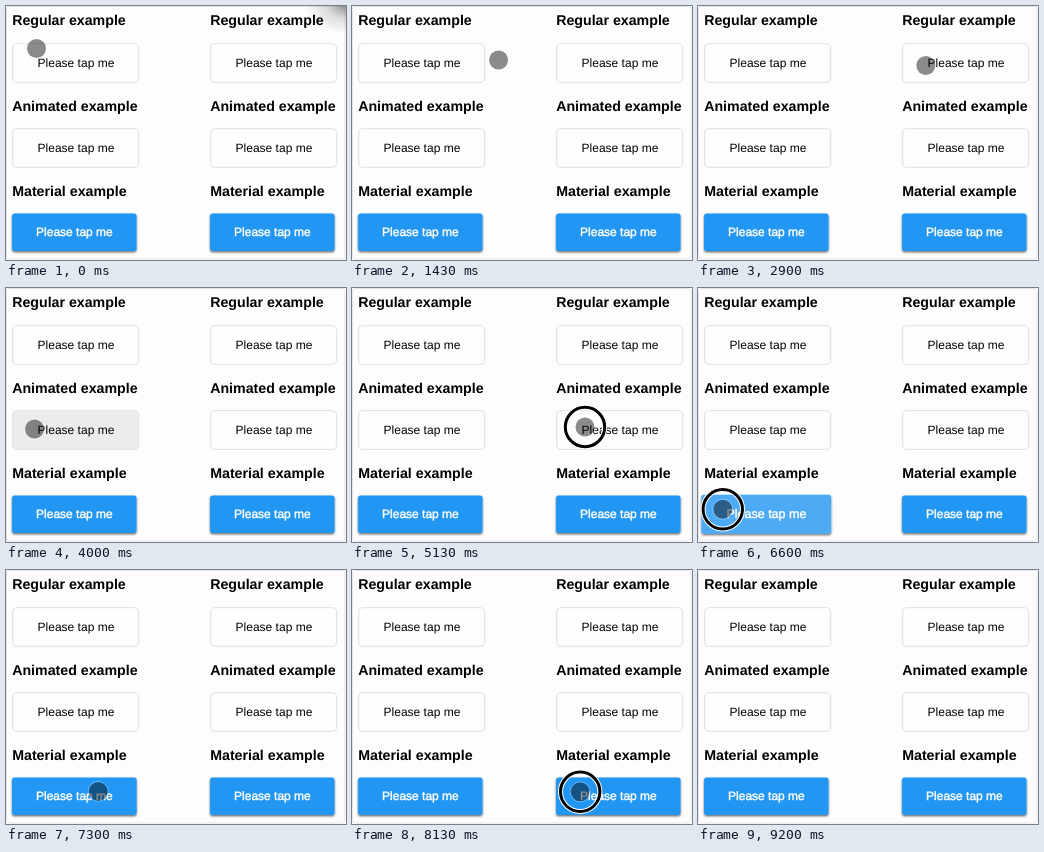
An HTML page that plays this animation: 340 by 254 pixels, repeating every 9.71 s.

```html
<!DOCTYPE html>
<html lang="en">
<head>
<meta charset="utf-8">
<title>Tap examples</title>
<style>
html, body { margin: 0; width: 100%; height: 100%; overflow: hidden; background: #fff; }
svg { display: block; width: 340px; height: 254px; }
text { font-family: "Liberation Sans", Arial, sans-serif; font-size: 12px; text-rendering: geometricPrecision; }
.title { font-size: 14.2px; font-weight: bold; }
.card { stroke: #e5e5e5; stroke-width: 1.4; }
.label { fill: #fff; stroke: #fff; stroke-width: .5; stroke-opacity: .8; text-anchor: middle; }
</style>
</head>
<body>
<svg viewBox="0 0 340 254">
  <defs>
    <filter id="shadow" x="-10%" y="-20%" width="120%" height="150%">
      <feDropShadow dx="0" dy="1.2" stdDeviation="1.2" flood-color="#000" flood-opacity=".62"/>
    </filter>
    <radialGradient id="shade">
      <stop offset="0" stop-opacity=".42"/>
      <stop offset=".45" stop-opacity=".13"/>
      <stop offset="1" stop-opacity="0"/>
    </radialGradient>
  </defs>
  <rect width="340" height="254" fill="#fff"/>
  <rect x=".5" y=".5" width="338.5" height="252.5" rx="3" fill="#fdfdfd" stroke="#e4e4e4"/>
  <ellipse id="corner" cx="340" cy="0" rx="42" ry="28" fill="url(#shade)"/>
  <g id="page"></g>
  <g id="cursor">
    <circle r="9.9" fill="none" stroke="#fff" stroke-opacity=".35"/>
    <circle r="9.5" fill="#000" fill-opacity=".45"/>
    <g id="ring" fill="none">
      <circle r="19.7" stroke="#fff" stroke-width="5"/>
      <circle r="19.7" stroke="#000" stroke-width="3"/>
    </g>
  </g>
</svg>
<script>
const LOOP = 9710;
const page = document.getElementById('page');
const corner = document.getElementById('corner');
const cursor = document.getElementById('cursor');
const ring = document.getElementById('ring');

const clamp = v => Math.min(1, Math.max(0, v));
const ramp = (t, a, b) => clamp((t - a) / (b - a));
const smooth = u => u * u * (3 - 2 * u);
const easeOut = u => 1 - (1 - u) * (1 - u);
const easeIn = u => u * u;
const mix = (a, b, u) => a + (b - a) * u;

function add(name, attrs, parent = page, text = '') {
  const el = document.createElementNS('http://www.w3.org/2000/svg', name);
  for (const key in attrs) el.setAttribute(key, attrs[key]);
  el.textContent = text;
  return parent.appendChild(el);
}

function card(x, y) {
  const box = add('rect', { class: 'card', x: x + .6, y: y + .6, width: 126, height: 38.8, rx: 4.5 });
  add('text', { x: x + 25.6, y: y + 24 }, page, 'Please tap me');
  return box;
}

function raised(x, y) {
  const group = add('g', {});
  const box = add('rect', { x: x - 62.2, y: y - 18.7, width: 124.4, height: 37.4, rx: 2.5, filter: 'url(#shadow)' }, group);
  add('text', { class: 'label', x: x + .1, y: y + 4 }, group, 'Please tap me');
  return { group, box, x, y };
}

const cards = [], buttons = [];
['Regular', 'Animated', 'Material'].forEach((kind, row) => {
  for (const x of [6, 204]) {
    add('text', { class: 'title', x: x + .2, y: [19, 105, 190][row] }, page, kind + ' example');
    if (row < 2) cards.push(card(x, 37 + row * 85));
    else buttons.push(raised(x + 62.3, 226.2));
  }
});

// Moves: start, end, x, y, easing, sideways bend
const moves = [
  [30, 230, 29, 59, easeOut, 0],
  [906, 1842, 228, 59.5, smooth, -5.5],
  [2890, 3580, 28.5, 141, smooth, 0],
  [4220, 5060, 233, 139, smooth, 0],
  [5660, 6440, 24.8, 221.3, smooth, 0],
  [6900, 7940, 228.2, 221.8, smooth, 0],
  [9000, 9200, 356, 228, easeIn, 0]
];

// Ring shown from, until
const taps = [[500, 870], [2030, 2470], [3600, 3930], [5070, 5530], [6460, 6860], [8040, 8500]];

// Active fill: on, release, time to fade
const active = [[500, 870, 1], [2230, 2470, 1], [3600, 3930, 900], [5330, 5530, 900]];
const lift = [[6460, 6860, 500], [8300, 8500, 270]];

function position(t) {
  let x = 30.5, y = 42.5;
  for (const [a, b, tx, ty, ease, bend] of moves) {
    if (t < a) break;
    const u = ease(ramp(t, a, b));
    x = mix(x, tx, u);
    y = mix(y, ty, u) + bend * Math.sin(Math.PI * u);
  }
  return [x, y];
}

const level = (t, [on, off, fade], rise) => ramp(t, on - .01, on + rise) * (1 - smooth(ramp(t, off, off + fade)));

function draw(t) {
  cards.forEach((box, i) => {
    const v = Math.round(mix(254, 236, level(t, active[i], .01)));
    box.setAttribute('fill', `rgb(${v},${v},${v})`);
  });
  buttons.forEach(({ group, box, x, y }, i) => {
    const k = level(t, lift[i], 100);
    const s = 1 + .043 * k;
    group.setAttribute('transform', `translate(${x} ${y}) scale(${s}) translate(${-x} ${-y})`);
    box.setAttribute('fill', `rgb(${mix(33, 77, k)},${mix(150, 171, k)},${mix(243, 246, k)})`);
  });
  corner.setAttribute('opacity', 1 - ramp(t, 500, 570));
  cursor.setAttribute('transform', `translate(${position(t)})`);
  ring.setAttribute('opacity', Math.max(...taps.map(([on, off]) => ramp(t, on - 1, on + 60) * (1 - ramp(t, off, off + 40)))));
}

const start = performance.now();
function tick() {
  draw((performance.now() - start) % LOOP);
  requestAnimationFrame(tick);
}
tick();
</script>
</body>
</html>
```
